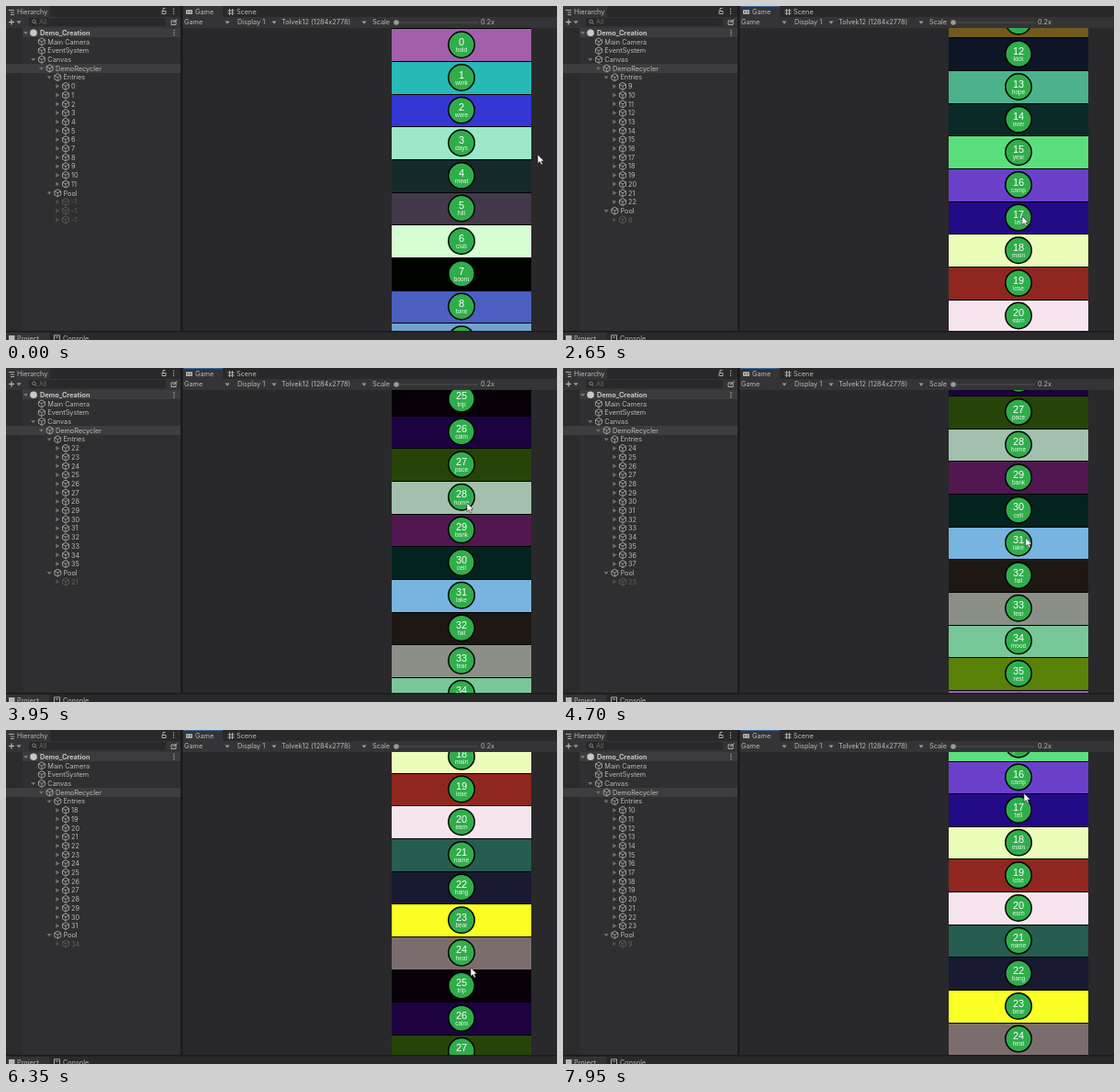
These frames come from a looping animation (600 by 364 pixels, 8000 ms). An HTML page with a canvas:

```html
<!DOCTYPE html>
<html lang="en">
<head>
<meta charset="utf-8">
<title>Recycling list demo</title>
<style>
html, body { margin: 0; width: 600px; height: 364px; overflow: hidden; background: #29282a; }
canvas { display: block; }
</style>
</head>
<body>
<canvas id="stage" width="600" height="364"></canvas>
<script>
const ctx = document.getElementById('stage').getContext('2d');
const LOOP = 8000, PITCH = 35.65, VISIBLE = 9.26, TREE_LAG = 200, POOL_SIZE = 15;
const UI = 'Inter, sans-serif', LIST = '"Liberation Sans", Arial, sans-serif';
const PANEL = '#2f2e30', BAR = '#343335', BACK = '#29282a', EDGE = '#1b1a1c', INK = '#bababa';

const words = ('hold work wore days meat hill club boom tone grey bowl ball kick hope over year camp tell main ' +
  'lose earn name hang bear heat trip calm pace home bank cell lake fail fear mood rest').split(' ');
const colors = ('a45fac 26b9b5 3336d3 9ce8c8 162a2b 43374a d5ffd3 000200 4b5fc0 71a2cc 253229 72591c 0e1527 ' +
  '4db28c 0a2927 5bdf7e 6a40cb 220a85 ecfdb9 8f2720 f7e5ee 275c50 191a32 faff24 7b6d6e 080009 1c023f 264408 ' +
  'a2c0ad 501750 03231e 77b4e0 1d1813 8b8f88 77c799 5a8208').split(' ');

const clamp = u => Math.min(1, Math.max(0, u));
const flick = u => 1 - (1 - u) ** 3;
const drag = u => u * u * (3 - 2 * u);

const gestures = [
  { start: 500, time: 1000, rows: 3.35, ease: flick },
  { start: 1700, time: 1000, rows: 8.37, ease: flick },
  { start: 2850, time: 2100, rows: 15.15, ease: flick },
  { start: 5430, time: 1300, rows: -10.69, ease: drag },
  { start: 6700, time: 700, rows: -4.08, ease: drag },
  { start: 7700, time: 600, rows: 9.63, ease: drag },
];
const scroll = t => gestures.reduce((sum, g) => sum + g.rows * g.ease(clamp((t - g.start) / g.time)), 0);

const pointerStops = [
  { t: 200, x: 579, y: 162 }, { t: 1450, x: 514, y: 234 }, { t: 2650, x: 500, y: 229 },
  { t: 3950, x: 502, y: 147 }, { t: 5650, x: 506, y: 239 }, { t: 6350, x: 506, y: 259 },
  { t: 7700, x: 503, y: 190 }, { t: 7950, x: 502, y: 69 },
];

function pointer(t) {
  const next = pointerStops.findIndex(stop => stop.t > t);
  if (next === 0) return pointerStops[0];
  if (next < 0) return pointerStops.at(-1);
  const a = pointerStops[next - 1], b = pointerStops[next];
  const u = drag((t - a.t) / (b.t - a.t));
  return { x: a.x + (b.x - a.x) * u, y: a.y + (b.y - a.y) * u };
}

function rect(x, y, w, h, color) {
  ctx.fillStyle = color;
  ctx.fillRect(x, y, w, h);
}

function text(str, x, y, color = INK, font = '7.3px ' + UI, align = 'left') {
  ctx.font = font;
  ctx.textAlign = align;
  ctx.textBaseline = 'middle';
  ctx.fillStyle = color;
  ctx.fillText(str, x, y);
}

function paint(fill, stroke, width = 0.9) {
  if (fill) { ctx.fillStyle = fill; ctx.fill(); }
  if (stroke) { ctx.strokeStyle = stroke; ctx.lineWidth = width; ctx.stroke(); }
}

function circle(x, y, r, fill, stroke, width) {
  ctx.beginPath();
  ctx.arc(x, y, r, 0, Math.PI * 2);
  paint(fill, stroke, width);
}

function shape(points, fill, stroke, width) {
  ctx.beginPath();
  points.forEach(([x, y]) => ctx.lineTo(x, y));
  ctx.closePath();
  paint(fill, stroke, width);
}

function box(x, y, w, h) {
  ctx.beginPath();
  ctx.rect(x, y, w, h);
  paint(null, INK);
}

function line(x0, y0, x1, y1, color = INK, width = 0.9) {
  ctx.beginPath();
  ctx.moveTo(x0, y0);
  ctx.lineTo(x1, y1);
  paint(null, color, width);
}

const downArrow = (x, y, color = '#999') => shape([[x - 2.5, y - 1.2], [x + 2.5, y - 1.2], [x, y + 2]], color);
const rightArrow = (x, y, color) => shape([[x - 1.5, y - 2.5], [x + 2.5, y], [x - 1.5, y + 2.5]], color);
const kebab = (x, y) => [-2.5, 0, 2.5].forEach(d => circle(x, y + d, 0.7, INK));

function cube(x, y, color) {
  const corner = i => {
    const a = Math.PI * (i / 3 + 1 / 6);
    return [x + 4 * Math.cos(a), y + 4 * Math.sin(a)];
  };
  shape([0, 1, 2, 3, 4, 5].map(corner), null, color);
  for (const i of [1, 3, 5]) line(x, y, ...corner(i), color, 0.8);
}

function drawTree(t) {
  const then = Math.max(0, t - TREE_LAG), pos = scroll(then);
  const rising = pos < scroll(Math.max(0, then - 50));
  const first = Math.max(0, Math.floor(pos) - 2), last = Math.floor(pos + VISIBLE) + 2;
  const spare = POOL_SIZE - (last - first + 1);
  const spareLabel = first === 0 ? -1 : rising ? last + 3 : first - 1;

  const nodes = [['Main Camera', 1], ['EventSystem', 1], ['Canvas', 1, 'open'], ['DemoRecycler', 2, 'open'], ['Entries', 3, 'open']];
  for (let n = first; n <= last; n++) nodes.push([n, 4, 'shut']);
  nodes.push(['Pool', 3, spare > 0 ? 'open' : '']);
  for (let n = 0; n < spare; n++) nodes.push([spareLabel, 4, 'shut', true]);

  rect(0, 24, 190, 330, PANEL);
  rect(0, 24, 18, 330, '#2b2a2c');
  rect(18, 24, 172, 10, '#3c3b3d');
  rect(0, 63, 190, 10, '#3d3c3e');
  downArrow(21.5, 29.3, '#777');
  circle(30, 29.3, 3.8, '#c8c8c8');
  text('Demo_Creation', 37, 29.9, '#c8c8c8', 'bold 7.3px ' + UI);
  kebab(183, 29.3);

  nodes.forEach(([label, depth, fold, dim], i) => {
    const y = 29.2 + 9.7 * (i + 1), x = 8.7 * depth;
    const foldColor = dim ? '#505050' : '#707070';
    if (fold === 'open') downArrow(21 + x, y, foldColor);
    if (fold === 'shut') rightArrow(21 + x, y, foldColor);
    cube(30.2 + x, y, dim ? '#5c5c5c' : '#acacac');
    text(label, 36.8 + 8.55 * depth, y + 0.6, dim ? '#606060' : INK);
  });
}

function drawList(pos) {
  const rowY = n => 42.3 + (n - pos) * PITCH;
  const edge = n => Math.round(rowY(n - 0.5));
  ctx.save();
  ctx.beginPath();
  ctx.rect(420, 24, 152, 330);
  ctx.clip();
  rect(420, 24, 152, 330, '#000');
  for (let n = Math.floor(pos); n <= pos + VISIBLE + 1; n++) {
    const y = rowY(n), item = n % words.length;
    rect(420, edge(n) + 1, 152, edge(n + 1) - edge(n) - 1, '#' + colors[item]);
    circle(496, y, 14.2, '#30ad4b', '#000', 1.5);
    text(n, 496, y - 2.3, '#fff', '10.9px ' + LIST, 'center');
    text(words[item], 496, y + 6, '#e6f7e9', '6.5px ' + LIST, 'center');
  }
  ctx.restore();
}

function drawTabs(focused) {
  rect(0, 0, 600, 364, BACK);
  rect(0, 0, 48, 12, BAR);
  rect(0, 12, 600, 12, BAR);
  rect(193, 0, 43, 12, BAR);
  if (focused) rect(193, 0, 43, 1, '#35659a');

  for (const i of [0, 1, 2]) line(i ? 5 : 3, 4.5 + 2.5 * i, 9, 4.5 + 2.5 * i);
  text('Hierarchy', 12, 6.9);
  box(170, 5.5, 4, 3);
  line(171, 5.5, 171, 2.5);
  line(171, 2.5, 173.5, 2.5);
  kebab(182.5, 5.8);

  rect(196, 4.3, 7, 4.5, INK);
  for (const x of [198, 201]) circle(x, 6.5, 0.8, BAR);
  text('Game', 206, 6.9);
  for (const d of [-1.5, 1.5]) {
    line(245 + d, 3, 245 + d, 10);
    line(241.5, 6.5 + d, 248.5, 6.5 + d);
  }
  text('Scene', 251, 6.9);
}

function drawToolbars() {
  line(3, 17.5, 9, 17.5, INK, 1.2);
  line(6, 14.5, 6, 20.5, INK, 1.2);
  downArrow(14, 17.5);
  rect(25, 13, 149, 9, BACK);
  circle(30.5, 16.8, 1.8, null, '#999', 0.8);
  line(31.8, 18.2, 33.5, 20, '#999');
  text('All', 36, 18.2, '#686868');
  box(180, 16, 5, 4.5);
  line(182, 18.5, 186.5, 14.5);

  const labels = { 'Game': 194, 'Display 1': 252, 'Tolvek12 (1284x2778)': 300, 'Scale': 399, '0.2x': 517 };
  for (const [label, x] of Object.entries(labels)) text(label, x, 18.3);
  for (const x of [241, 292, 390]) downArrow(x, 17.8);
  line(428, 18, 514, 18, '#505050', 1);
  circle(425, 18, 2.8, '#999');
}

function drawFooter() {
  rect(190, 0, 2.5, 354, EDGE);
  rect(0, 354, 600, 10, BACK);
  rect(0, 354, 600, 1.5, EDGE);
  rect(0, 356, 47, 8, BAR);
  rect(3, 359, 6.5, 5, INK);
  text('Project', 12, 362.6);
  box(52.5, 358.8, 6, 6);
  line(54, 361, 57, 361);
  text('Console', 62, 362.6);
}

function drawPointer({ x, y }) {
  const outline = [[0, 0], [0, 9.5], [2.2, 7.6], [3.8, 11], [5.4, 10.2], [3.9, 7], [6.8, 6.8]];
  shape(outline.map(([dx, dy]) => [x + dx, y + dy]), '#fff', '#222', 0.6);
}

function frame(t) {
  drawTabs(t >= 1200);
  drawToolbars();
  drawTree(t);
  drawList(scroll(t));
  drawFooter();
  drawPointer(pointer(t));
}

function tick() {
  frame(performance.now() % LOOP);
  requestAnimationFrame(tick);
}
tick();
</script>
</body>
</html>
```
